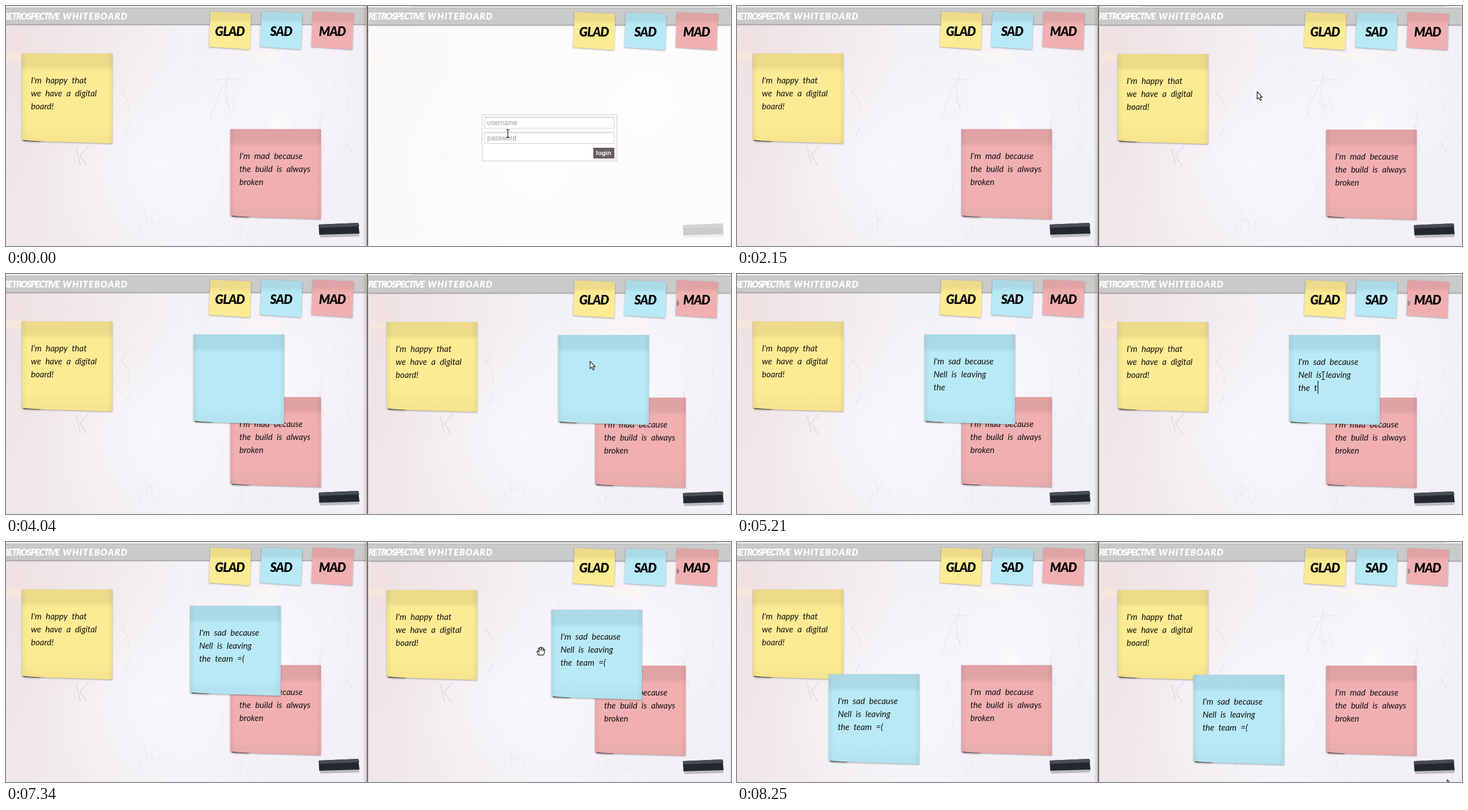
Write an HTML page with a canvas that moves like this. It is 1280 px wide and 425 px high and loops after 8.35 s.

```html
<!DOCTYPE html>
<html lang="en">
<head>
<meta charset="utf-8">
<title>Retrospective whiteboard</title>
<style>
  html, body { margin: 0; width: 100%; height: 100%; overflow: hidden; background: #f3f0f4; }
  canvas { display: block; width: 1280px; height: 425px; }
</style>
</head>
<body>
<canvas id="stage" width="1280" height="425"></canvas>
<script>
const H = 425, LOOP = 8350;
const stage = document.getElementById('stage').getContext('2d');
let c = stage;

const PAPER = {
  glad: { base: '#fdeb93', band: '#eddb8a' },
  sad: { base: '#b8e9f6', band: '#abdae6' },
  mad: { base: '#f0b0b1', band: '#e0a2a4' }
};
const HAND = 'italic 15px Lato, "Open Sans", sans-serif';
const MARKER = 'Lato, "Open Sans", sans-serif';
const UI = '"Liberation Sans", Arial, sans-serif';

const LOGIN_END = 2060, PICK = 3150, DROP = 3890, DRAG = 7200, RELEASE = 7880;
const KEY_GAP = 160, USER = 'tea', PASS_LENGTH = 6;
const NEAR_LAG = 70, FAR_LAG = 105;
const SAD_LINES = ["I'm sad because", 'Nell is leaving', 'the team =('];

// Key points: time, then the values reached
const TYPING = [[4380, 0], [4490, 16], [4770, 16], [5210, 37], [5920, 43]];
const MOUSE = [
  [80, 886, 226], [230, 888, 208], [2000, 888, 208], [2150, 918, 152],
  [2850, 1143, 30], [PICK, 1143, 30], [3580, 1036, 86], [DROP, 1027, 127],
  [4180, 1035, 180], [5840, 1035, 180], [6600, 1040, 104],
  [DRAG, 989, 128], [7270, 977, 139], [7340, 945, 193], [7410, 919, 203], [7660, 919, 203],
  [7705, 856, 243], [7810, 856, 243], [RELEASE, 820, 255], [8250, 1254, 421]
];

const clamp = (v, lo, hi) => Math.min(hi, Math.max(lo, v));

function glide(keys, t) {
  const i = keys.findIndex(k => k[0] > t);
  if (i === 0) return keys[0].slice(1);
  if (i < 0) return keys[keys.length - 1].slice(1);
  const a = keys[i - 1], b = keys[i];
  const k = (t - a[0]) / (b[0] - a[0]);
  return a.slice(1).map((v, n) => v + (b[n + 1] - v) * k);
}

const typedCount = t => Math.floor(glide(TYPING, t)[0]);
const keyPresses = (t, start, max) => clamp(Math.floor((t - start) / KEY_GAP), 0, max);

// The new note trails the mouse while it is dragged
function sadPlace(t, lag) {
  const [x, y] = glide(MOUSE, clamp(t - lag, DRAG, RELEASE));
  return [Math.round(x - 658), Math.round(y - 21)];
}

function rect(x, y, w, h, fill) {
  c.fillStyle = fill;
  c.fillRect(x, y, w, h);
}

function poly(points, fill) {
  c.beginPath();
  points.forEach(([x, y]) => c.lineTo(x, y));
  c.closePath();
  c.fillStyle = fill;
  c.fill();
}

function text(s, x, y, font, fill, spacing = 0, words = 0) {
  c.font = font;
  c.fillStyle = fill;
  c.letterSpacing = spacing + 'px';
  c.wordSpacing = words + 'px';
  c.fillText(s, x, y);
}

function shadow(color, blur, dx = 0, dy = 0) {
  c.shadowColor = color;
  c.shadowBlur = blur;
  c.shadowOffsetX = dx;
  c.shadowOffsetY = dy;
}
const noShadow = () => shadow('transparent', 0);

function linear(x0, y0, x1, y1, ...stops) {
  const g = c.createLinearGradient(x0, y0, x1, y1);
  stops.forEach(([p, col]) => g.addColorStop(p, col));
  return g;
}

function glow(x, y, r, rgb, alpha) {
  const g = c.createRadialGradient(x, y, 0, x, y, r);
  g.addColorStop(0, `rgba(${rgb},${alpha})`);
  g.addColorStop(1, `rgba(${rgb},0)`);
  rect(0, 0, 640, H, g);
}

function random(seed) {
  return () => (seed = (seed * 16807) % 2147483647) / 2147483647;
}

// A patch of faint scribbles
function scratches(x, y, w, h, rnd) {
  for (let i = 0; i < 11; i++) {
    const px = x + rnd() * w, py = y + rnd() * h;
    const dx = (rnd() - 0.4) * 24, dy = 8 + rnd() * 22;
    c.strokeStyle = `rgba(140,135,148,${0.04 + rnd() * 0.08})`;
    c.lineWidth = 0.7 + rnd();
    c.beginPath();
    c.moveTo(px, py);
    c.quadraticCurveTo(px + dx * rnd(), py + dy * 0.6, px + dx, py + dy);
    c.stroke();
  }
}

function wall() {
  rect(0, 0, 640, H, linear(0, 0, 640, 0, [0, '#f0e6e9'], [0.25, '#f2edf1'], [0.5, '#f4f2f6'], [1, '#f2f0f6']));
  glow(30, 70, 260, '238,216,214', 0.35);
  glow(270, 280, 210, '250,250,254', 0.7);
  glow(490, 170, 170, '250,249,253', 0.7);
  glow(482, 208, 26, '255,255,252', 0.7);
  rect(0, 83, 27, 13, 'rgba(248,234,216,.7)');
  rect(419, 82, 70, 11, 'rgba(251,247,242,.7)');
  const rnd = random(77);
  scratches(190, 125, 50, 90, rnd);
  scratches(366, 112, 40, 95, rnd);
  scratches(225, 355, 50, 40, rnd);
  scratches(375, 370, 90, 30, rnd);
  scratches(550, 120, 60, 130, rnd);
  scratches(0, 100, 620, 290, rnd);
  c.strokeStyle = 'rgba(125,120,130,.17)';
  c.lineWidth = 1.6;
  c.stroke(new Path2D('M124 250 L131 281 M146 247 L131 264 L143 283'));
  c.strokeStyle = 'rgba(135,130,145,.1)';
  c.stroke(new Path2D('M368 131 L415 129 M393 123 Q382 160 397 184 M388 133 Q364 180 360 205'));
}

function eraser(x, y) {
  c.save();
  c.translate(x, y);
  poly([[1, 20], [72, 18], [71, 24], [3, 26]], 'rgba(120,122,130,.45)');
  poly([[0, 3], [70, 0], [72, 19], [1, 21]], '#222730');
  poly([[0, 3], [70, 0], [72, 6], [1, 9]], '#484d55');
  c.restore();
}

function title(x) {
  const font = 'italic 900 16px ' + MARKER;
  text('RETROSPECTIVE', x - 5, 24, font, '#fff', -1.5);
  text('WHITEBOARD', x + 100, 24, font, '#fff', 1.2);
}

function label(kind, x, y) {
  const paper = PAPER[kind];
  c.save();
  c.translate(x, y);
  shadow('rgba(0,0,0,.35)', 3, 0, 1);
  poly([[3, 0], [74.5, 3], [72.5, 67], [0, 62]],
    linear(0, 0, 0, 66, [0, paper.band], [0.2, paper.band], [0.34, paper.base], [1, paper.base]));
  noShadow();
  c.textAlign = 'center';
  text(kind.toUpperCase(), 37, 43, 'italic 900 22px ' + MARKER, '#050505', -1);
  c.restore();
}

function labels(x, y) {
  Object.keys(PAPER).forEach((kind, i) => label(kind, x + 358 + 90.5 * i, y));
}

function note(kind, x, y, lines) {
  const paper = PAPER[kind];
  c.save();
  c.translate(x, y);
  shadow('rgba(0,0,0,.5)', 3, 0, 1);
  poly([[2, 150], [40, 153], [30, 156], [3, 155]], 'rgba(70,62,60,.7)');
  shadow('rgba(0,0,0,.35)', 2.5, 0, 1);
  const sheet = new Path2D('M0 0 H160 V159.5 L80 157 Q30 156 0 153 Z');
  c.fillStyle = paper.base;
  c.fill(sheet);
  noShadow();
  c.clip(sheet);
  rect(0, 0, 160, 32, linear(0, 0, 0, 32, [0, paper.band], [0.7, paper.band], [1, paper.base]));
  rect(0, 125, 160, 35, linear(0, 125, 0, 160, [0, 'rgba(0,0,0,0)'], [1, 'rgba(0,0,0,.035)']));
  rect(0, 0, 160, 160, linear(0, 0, 160, 0, [0, 'rgba(0,0,0,.05)'], [0.06, 'rgba(0,0,0,0)'],
    [0.94, 'rgba(0,0,0,0)'], [1, 'rgba(0,0,0,.05)']));
  lines.forEach((s, i) => text(s, 16, 53 + 23 * i, HAND, '#120f0d', 0, 4));
  c.restore();
}

// The first letters of the message, split into lines
function typedLines(count) {
  return SAD_LINES.map(s => {
    const part = s.slice(0, Math.max(0, count));
    count -= s.length + 1;
    return part;
  });
}

function baseNotes() {
  note('mad', 396, 218, ["I'm mad because", 'the build is always', 'broken']);
  note('glad', 28, 84, ["I'm happy that", 'we have a digital', 'board!']);
}

function caret(x, y, lines) {
  const row = lines[2] ? 2 : lines[1] || lines[0] === SAD_LINES[0] ? 1 : 0;
  c.font = HAND;
  c.letterSpacing = '0px';
  c.wordSpacing = '4px';
  rect(Math.round(x + 17 + c.measureText(lines[row]).width), y + 35 + 23 * row, 1.4, 23, '#17394a');
}

function field(y, hint, value, focus) {
  rect(845, y, 229, 21, focus ? '#a9a9a9' : '#cfcfcf');
  rect(846, y + 1, 227, 19, linear(0, y + 1, 0, y + 4, [0, '#e4e4e4'], [1, '#fff']));
  text(value || hint, 849.5, y + 15, '12px ' + UI, value ? '#333' : '#999');
}

function login(t) {
  const onPassword = t >= 750;
  rect(840, 192, 239, 83, '#cbcbcb');
  rect(841, 193, 237, 81, '#fff');
  field(196, 'username', USER.slice(0, keyPresses(t, 230, USER.length)), t >= 150 && !onPassword);
  field(223, 'password', '•'.repeat(keyPresses(t, 780, PASS_LENGTH)), onPassword);
  rect(1037, 251, 37, 19, '#665f60');
  c.textAlign = 'center';
  text('login', 1055, 264, 'bold 11px ' + UI, '#fff');
  c.textAlign = 'start';
}

const ARROW = new Path2D('M0 0 V13 L3 10.3 L5.2 15.2 L7.3 14.3 L5.2 9.5 H9.2 Z');
const PALM = new Path2D('M-4 7 L-7 2 Q-7.5 -1 -4.5 .5 L-3.5 2 L-5 -4 Q-4.5 -6.5 -2.5 -4.5 L-2 -1 L-2 -6 Q-.5 -8 .8 -6 V-1 L1.6 -5.5 Q3.5 -7 4 -4.8 L3.7 0 L5 -3 Q6.8 -4 6.8 -1.5 L5.2 5 L4.5 7 Z');
const BEAM = new Path2D('M-3 -7 H-1 L0 -6 L1 -7 H3 M0 -6 V6 M-3 7 H-1 L0 6 L1 7 H3');

function cursor(t) {
  const overText = t < LOGIN_END || (t >= 4080 && t < 6150);
  const overNote = t >= 6750 && t < RELEASE + 100;
  c.save();
  c.translate(...glide(MOUSE, t));
  c.lineJoin = 'round';
  c.lineWidth = 1.1;
  c.strokeStyle = '#111';
  c.fillStyle = '#fff';
  const shape = overText ? BEAM : overNote ? PALM : ARROW;
  if (!overText) c.fill(shape);
  c.stroke(shape);
  c.restore();
}

function header(x, w, h) {
  rect(x, 0, w, 3, '#ececec');
  rect(x, 3, w, h, '#cacaca');
  rect(x, 3, w, 1, '#b2b2b2');
  rect(x, 2 + h, w, 1.3, '#a4a4a4');
  rect(x, 3 + h, w, 3, linear(0, 3 + h, 0, 6 + h, [0, 'rgba(0,0,0,.16)'], [1, 'rgba(0,0,0,0)']));
}

function inside(x, w, draw) {
  c.save();
  c.beginPath();
  c.rect(x, 0, w, H);
  c.clip();
  draw();
  c.restore();
}

function layer(draw) {
  const el = document.createElement('canvas');
  el.width = 640;
  el.height = H;
  c = el.getContext('2d');
  draw();
  c = stage;
  return el;
}
const wallLayer = layer(wall);

function leftBoard(t) {
  c.drawImage(wallLayer, 0, 0);
  header(0, 637, 30);
  title(0);
  labels(0, 10);
  eraser(552, 384);
  baseNotes();
  if (t >= DROP) note('sad', ...sadPlace(t, FAR_LAG), typedLines(typedCount(t - 40)));
  rect(630, 0, 7, H, linear(630, 0, 637, 0, [0, 'rgba(0,0,0,0)'], [1, 'rgba(0,0,0,.16)']));
}

function rightNotes(t) {
  c.save();
  c.translate(644, 1);
  baseNotes();
  if (t >= DROP) {
    const [x, y] = sadPlace(t, NEAR_LAG), lines = typedLines(typedCount(t));
    note('sad', x, y, lines);
    if (t >= 4120 && t < 6500) caret(x, y, lines);
  }
  c.restore();
}

function rightBoard(t) {
  const locked = t < LOGIN_END;
  rect(639, 0, 4, H, '#f0e6e9');
  c.drawImage(wallLayer, 643, 1);
  eraser(1195, 385);
  if (locked) rect(639, 34, 641, H, 'rgba(255,255,255,.76)');
  header(639, 641, 31);
  rect(715, 0, 537, 1, '#bcbcbc');
  title(644.5);
  labels(643, 11);
  if (t >= PICK) poly([[1184, 46], [1189, 50], [1188, 55], [1184, 57]], '#9c8a91');
  if (locked) login(t);
  else rightNotes(t);
  if (t >= PICK && t < DROP) {
    const [x, y] = glide(MOUSE, t);
    label('sad', x - 53, y - 19);
  }
  rect(1279, 0, 1, H, '#d9d8da');
  cursor(t);
}

function draw(now) {
  const t = now % LOOP;
  inside(0, 637, () => leftBoard(t));
  inside(639, 641, () => rightBoard(t));
  rect(636, 0, 1, H, '#d2cecb');
  rect(637, 0, 2, H, t < 150 ? '#765a50' : '#6f6b55');
  rect(639, 0, 1, H, '#c9c5c2');
  requestAnimationFrame(draw);
}
requestAnimationFrame(draw);
</script>
</body>
</html>
```
